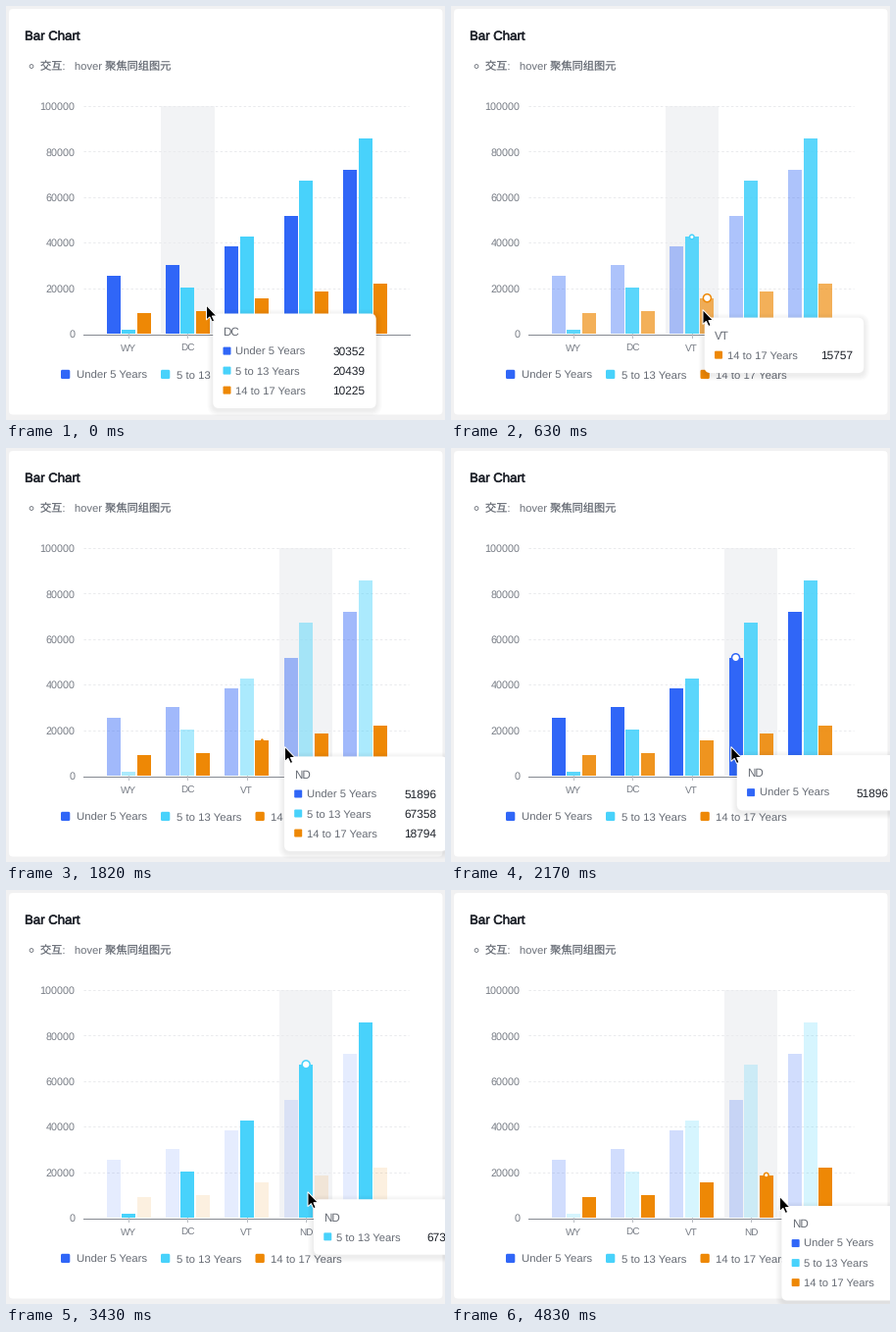
Write a matplotlib script that moves like this. It is 448 px wide and 422 px high and loops after 4900 ms.

```python
import numpy as np
import matplotlib.pyplot as plt
from matplotlib.animation import FuncAnimation
from matplotlib.patches import Circle, FancyBboxPatch, Polygon, Rectangle
from matplotlib.patheffects import withStroke

W, H, DPI = 448, 422, 100
FRAMES, STEP_MS = 70, 70
plt.rcParams["font.family"] = ["Liberation Sans", "Noto Sans CJK JP"]
plt.rcParams["text.hinting"] = "no_hinting"

SERIES = ["Under 5 Years", "5 to 13 Years", "14 to 17 Years"]
LABEL_W = [74, 67, 70]
COLORS = ["#3066f7", "#48d2fb", "#ee8805"]
STATES = ["WY", "DC", "VT", "ND", "AK"]
VALUES = [
    [25635, 1890, 9314],
    [30352, 20439, 10225],
    [38253, 42538, 15757],
    [51896, 67358, 18794],
    [72083, 85640, 22153],
]
BASE, PLOT_H = 334.3, 232.3
BAR_W, BAND_W = 14, 54.4
GREY, LIGHT, DARK = "#666b74", "#777c85", "#1d2129"

fig = plt.figure(figsize=(W / DPI, H / DPI), dpi=DPI, facecolor="#f1f1f2")
ax = fig.add_axes([0, 0, 1, 1])
ax.set_xlim(0, W)
ax.set_ylim(H, 0)
ax.axis("off")


def center(state):
    return 125.1 + 60.35 * state


def bar_x(state, series):
    return center(state) + 15.6 * (series - 1)


def value_y(value):
    return BASE - value * PLOT_H / 100000


def px(width):
    return width * 72 / DPI


def text(x, y, s, size, color=GREY, ha="left", z=5, **kw):
    return ax.text(x, y, s, fontsize=px(size), color=color, ha=ha,
                   va="center_baseline", zorder=z, **kw)


def rounded(x, y, w, h, r, color, z, **kw):
    box = FancyBboxPatch((x, y), w, h, boxstyle=f"round,pad=0,rounding_size={r}",
                         facecolor=color, edgecolor="none", zorder=z, **kw)
    return ax.add_patch(box)


def line(x0, y0, x1, y1, color, z, **kw):
    ax.plot([x0, x1], [y0, y1], color=color, lw=px(1), zorder=z, **kw)


# Card, heading, axes and legend
rounded(3, 3, 442.5, 413.5, 4, "white", 0)
text(19, 30, "Bar Chart", 13.2, DARK, path_effects=[withStroke(linewidth=0.35, foreground=DARK)])
ax.add_patch(Circle((26, 61.5), 1.9, fc="none", ec=GREY, lw=px(0.8)))
text(35, 61.3, "交互:   hover 聚焦同组图元", 11.2, "#6a6f78")

for tick in range(0, 100001, 20000):
    y = value_y(tick)
    text(70.5, y, str(tick), 10.7, LIGHT, ha="right")
    if tick:
        line(79, y, 411, y, "#e9eaed", 2, dashes=(2.4, 2.4), dash_capstyle="butt")
line(79, BASE + 0.2, 411.5, BASE + 0.2, "#868a92", 4)
for i, name in enumerate(STATES):
    line(center(i), BASE, center(i), BASE + 4, "#b9bcc2", 4)
    text(center(i), 348.7, name, 10, LIGHT, ha="center")

for x, name, color in zip((56, 158, 254.5), SERIES, COLORS):
    rounded(x, 370.8, 9.3, 9.3, 1.5, color, 5)
    text(x + 15.8, 375.6, name, 11.4)

# Moving parts
band = ax.add_patch(Rectangle((0, 102), BAND_W, BASE - 102, fc="#f2f3f5", zorder=1))
bars, markers = {}, {}
for i, row in enumerate(VALUES):
    for s, v in enumerate(row):
        x, y = bar_x(i, s), value_y(v)
        bars[i, s] = ax.add_patch(Rectangle((x - BAR_W / 2, y), BAR_W, BASE - y,
                                            fc=COLORS[s], ec="none", zorder=3))
        markers[i, s] = ax.add_patch(Circle((x, y), 0, fc="white", ec=COLORS[s],
                                            lw=px(1.5), zorder=6))

shadows = [rounded(0, 0, 1, 1, 6 + g, DARK, 7, alpha=0.011) for g in range(1, 7)]
tip_box = rounded(0, 0, 1, 1, 6, "white", 8)
tip_title = text(0, 0, "", 11.6, z=9)
tip_rows = [(rounded(0, 0, 8, 8, 1, c, 9), text(0, 0, name, 11.2, z=9),
             text(0, 0, "", 11.9, DARK, ha="right", z=9))
            for c, name in zip(COLORS, SERIES)]

ARROW = np.array([(0, 0), (0, 15), (3.4, 11.9), (5.8, 17), (8.2, 16),
                  (5.9, 11), (10.5, 11)])
cursor = ax.add_patch(Polygon(ARROW, fc="black", ec="white", lw=px(1), zorder=12))

# Pointer path as (frame, x, y); everything else reacts to it
PATH = np.array([
    (0, 204.5, 305), (9, 257, 309.5), (23, 256, 310), (26, 284.5, 304.5),
    (30, 284.5, 304.5), (38, 295, 304.5), (40, 304, 304.5), (47, 306, 305),
    (50, 309, 309), (54, 319, 314), (57, 322, 315), (65, 322, 315),
    (68, 326, 314.5), (69, 335.5, 312.5),
])
REACH = 5.5
TIP_OFFSET, TIP_FOLLOW = np.array([6.7, 26]), 0.54
FADE_STEP, DIM = 0.21, 0.12
MARKER_R, MARKER_SHRINK = 4, 1.7


def hovered(pointer):
    """Nearest state, and the series whose bar lies under the pointer, if any."""
    x, y = pointer
    state = min(range(len(STATES)), key=lambda i: abs(x - center(i)))
    for s, v in enumerate(VALUES[state]):
        if abs(x - bar_x(state, s)) < REACH and y > value_y(v):
            return state, s
    return state, None


def simulate():
    """Play the pointer path once and record the chart's reaction per frame."""
    level = np.ones(len(SERIES))
    radius = np.zeros((len(STATES), len(SERIES)))
    tip = PATH[0, 1:] + TIP_OFFSET
    for frame in range(FRAMES):
        pointer = np.array([np.interp(frame, PATH[:, 0], PATH[:, k]) for k in (1, 2)])
        state, series = hovered(pointer)
        tip = tip + TIP_FOLLOW * (pointer + TIP_OFFSET - tip)
        lit = np.array([series in (None, s) for s in range(len(SERIES))])
        level = np.clip(level + np.where(lit, FADE_STEP, -FADE_STEP), 0, 1)
        radius = np.maximum(radius - MARKER_SHRINK, 0)
        if series is not None:
            radius[state, series] = MARKER_R
        alpha = DIM + (1 - DIM) * level ** 2 * (3 - 2 * level)
        yield pointer, state, series, tip, alpha, radius.copy()


TIMELINE = list(simulate())


def draw_tooltip(x, title_y, state, series):
    rows = list(range(len(SERIES))) if series is None else [series]
    content_w = 71 + max(LABEL_W[s] for s in rows)
    top, width, height = title_y - 17.5, content_w + 21.5, 36.5 + 20 * len(rows)
    tip_box.set_bounds(x, top, width, height)
    for grow, shadow in enumerate(shadows, 1):
        shadow.set_bounds(x - grow, top - grow + 2, width + 2 * grow, height + 2 * grow)
    left = x + 10.3
    tip_title.set_position((left, title_y + 0.4))
    tip_title.set_text(STATES[state])
    for s, parts in enumerate(tip_rows):
        for part in parts:
            part.set_visible(s in rows)
        if s in rows:
            swatch, label, value = parts
            y = title_y + 20.8 + 20 * rows.index(s)
            swatch.set_bounds(left, y - 4.2, 8, 8)
            label.set_position((left + 12.8, y))
            value.set_position((left + content_w, y))
            value.set_text(str(VALUES[state][s]))


def update(frame):
    pointer, state, series, tip, alpha, radius = TIMELINE[frame]
    band.set_x(center(state) - BAND_W / 2)
    for (i, s), bar in bars.items():
        bar.set_alpha(alpha[s])
        markers[i, s].set_radius(radius[i, s])
        markers[i, s].set_visible(radius[i, s] > 0)
    draw_tooltip(*tip, state, series)
    cursor.set_xy(ARROW + pointer)
    return []


anim = FuncAnimation(fig, update, frames=FRAMES, interval=STEP_MS, repeat=True,
                     repeat_delay=0, init_func=lambda: update(0), blit=False)
plt.show()
```
